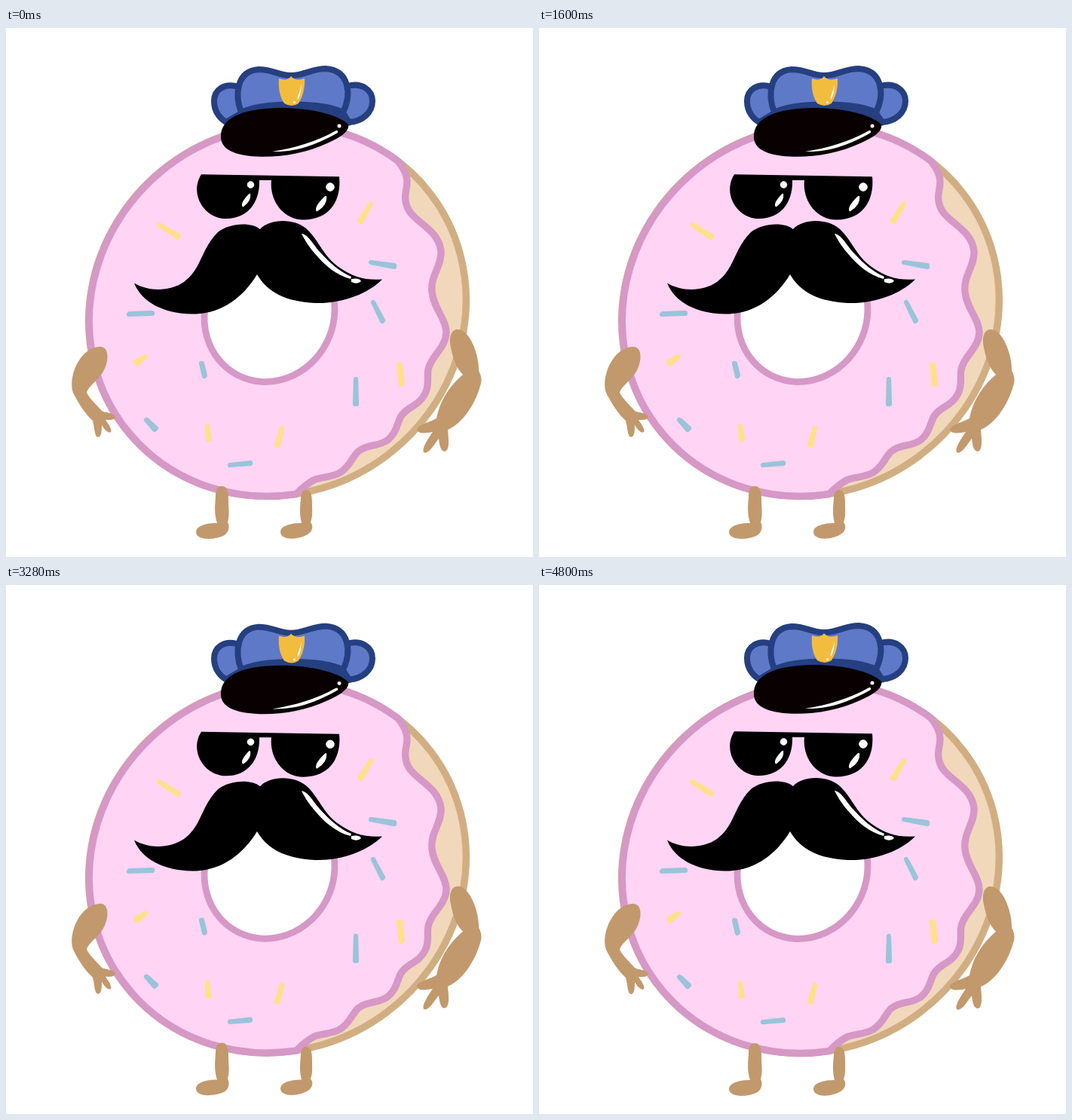
An HTML page that plays this animation: 699x702 px, repeating every 4.88 s.

```html
<!DOCTYPE html>
<html lang="en">
<head>
<meta charset="utf-8">
<title>Bouncing doughnut officer</title>
<style>
  html, body { margin: 0; width: 100%; height: 100%; overflow: hidden; background: #fff; }
  svg { display: block; width: 100%; height: 100%; }
  .sprinkles { stroke-width: 6.2; stroke-linejoin: round; }
</style>
</head>
<body>
<svg viewBox="0 0 699 702">
  <g id="officer">
    <!-- dough, icing and hole -->
    <ellipse cx="360" cy="375" rx="255.5" ry="240.9" transform="rotate(-37 360 375)"
      fill="#f1d8ba" stroke="#d1ae82" stroke-width="9.4"/>
    <path fill="#ffd4f4" stroke="#d698c6" stroke-width="9.4" stroke-linejoin="round"
      d="M520 176.700C526 184 532 193 532 204C532 216 527 222 531 234C537 258 573 264 577 296
         C578 316 563 328 565 350C567 372 584 386 584 404C583 426 564 434 560 453
         C558 464 562 473 556 485C547 503 531 502 523 517C518 528 517 538 506 547
         C493 556 479 552 467 562C458 571 456 582 443 590C431 597 419 595 408 600Q397 606 385 618.500
         A255.500 240.900 -37 1 1 520 176.700Z"/>
    <ellipse cx="349.500" cy="379" rx="91.900" ry="85" transform="rotate(-63 349.500 379)"
      fill="#fff" stroke="#d698c6" stroke-width="8.800"/>

    <path class="sprinkles" fill="#ffe08a" stroke="#ffe08a"
      d="M203 261L228 278L229 276Z M484 233L471 257L469 256Z M185 436L174 446L172 443Z
         M267 528L270 546L268 546Z M366 531L361 554L359 553Z M521 447L523 447L526 472L524 473Z"/>
    <path class="sprinkles" fill="#99c4d9" stroke="#99c4d9"
      d="M484 311L515 315L515 317Z M163 380L164 379L194 378L194 379Z M487 364L500 388L499 389Z
         M259 445L260 445L264 461L263 462Z M186 520L188 521L199 531L197 533Z
         M464 466L465 499L463 499Z M297 580L324 577L324 578Z"/>

    <!-- limbs -->
    <g fill="#c2996c">
      <path d="M124 423C140 422 136 450 124 463C116 472 108 478 107 484C112 493 120 500 127 508
        C132 511 143 510 145 516C144 521 136 520 132 520C136 526 141 533 139 536C136 539 130 532 127 527
        C127 533 127 543 122 543C117 542 118 532 115 521C105 512 97 500 89 484C82 466 96 425 124 423Z"/>
      <path d="M598 400C590 401 587 412 590 424C593 440 598 452 606 460C589 474 575 495 571 518
        C565 522 545 527 545 533C547 540 560 537 566 536C560 545 551 558 554 563C560 567 568 552 574 545
        C575 552 576 562 582 562C589 560 587 545 586 533C605 525 622 500 629 475C632 467 630 460 627 455
        C628 435 615 398 598 400Z"/>
      <path d="M286 608C293 608 295 614 295 625C295 638 297 645 294 656C297 661 296 670 288 674
        C277 679 253 681 252 669C252 660 267 657 280 657C276 645 277 635 278 622C278 613 280 608 286 608Z"/>
      <path d="M398 613C405 613 406 622 406 631C406 642 407 648 404 656C408 660 407 668 400 672
        C389 679 365 681 364 669C364 660 379 657 392 657C389 645 390 635 391 625C391 618 393 613 398 613Z"/>
    </g>

    <!-- moustache -->
    <path d="M170 338.500C189 350 217 350 236 337C260 319 258 294 281 271C296 259 325 257 337 267
      C351 252 383 253 398 266C415 281 420 302 441 317C461 331 477 335 499 333.500
      C480 353 445 366 410 365C371 363 347 351 333 327C313 360 283 380 247 379.500C209 379 180 364 170 338.500Z"/>
    <path fill="#fff" d="M392 273C401 274 407 287 417 298C430 312 442 323 458 330L457 333
      C438 328 422 314 412 302C403 292 397 283 392 273Z M458 333Q469 331 471 336Q466 341 458 337Z"/>

    <!-- sunglasses -->
    <path d="M259 194.300L442 197.300C445 227 431 254 395 254.500C368 255 349 229 352 202L336 202
      C337 231 321 253 292 253C262 253 243 219 259 194.300Z"/>
    <g fill="#fff" stroke="#fff" stroke-linejoin="round">
      <circle cx="324.500" cy="208" r="4.300"/>
      <circle cx="430" cy="211" r="5.300"/>
      <path stroke-width="2.500" d="M323 221Q324 229 314.500 236Q312.500 232 323 221Z
        M424 224Q425 234 412.500 242Q410.500 237 424 224Z"/>
    </g>

    <!-- cap -->
    <g fill="#5f79c9" stroke="#253f80" stroke-width="8" stroke-linejoin="round">
      <path d="M308 78C290 72 276 82 276 97C276 112 285 121 292 125L314 112Z"/>
      <path d="M453 77C472 72 486 82 486 97C486 113 472 124 455 125L445 110Z"/>
      <path d="M312 112C303 88 306 57 335 55C355 55 360 63 378 63C396 63 405 54 424 54
        C455 56 459 87 447 112C420 98 340 98 312 112Z"/>
    </g>
    <path fill="#253f80" d="M292 128C306 108 340 99 378 98C414 98 442 106 458 129L430 135L310 135Z"/>
    <path fill="#090001" d="M285 143C285 124 305 110 345 107C390 103 439 113 454 128
      C456 137 444 145 426 153C396 167 362 172 332 170.500C305 169 284 162 285 143Z"/>
    <path fill="#fff" d="M353 164C384 159 411 151 437 136.500Q441 135 440 139C415 153 388 165 353 164Z"/>
    <circle cx="442" cy="130" r="2.500" fill="#fff"/>
    <path fill="#f2bd3f" d="M362 67Q373 71 378 64Q384 71 396 67C397 81 393 92 388 100
      Q379 106 369 100C363 91 361 80 362 67Z"/>
    <path fill="#fff" d="M391.500 74Q392 88 387 95Q386 92 388.500 87Q391 81 391.500 74Z"/>
    <circle cx="382.500" cy="98.500" r="1.500" fill="#fff"/>
  </g>
</svg>
<script>
const LOOP = 4880, STEP = 80, PERIOD = 1600, MIDDLE = 364;
const officer = document.getElementById('officer');
const start = performance.now();

function draw() {
  const elapsed = (performance.now() - start) % LOOP;
  const t = Math.floor(elapsed / STEP) * STEP;
  const squash = 0.958 + 0.042 * Math.cos(2 * Math.PI * t / PERIOD);
  officer.setAttribute('transform', `matrix(1 0 0 ${squash} 0 ${MIDDLE * (1 - squash)})`);
  requestAnimationFrame(draw);
}
draw();
</script>
</body>
</html>
```
